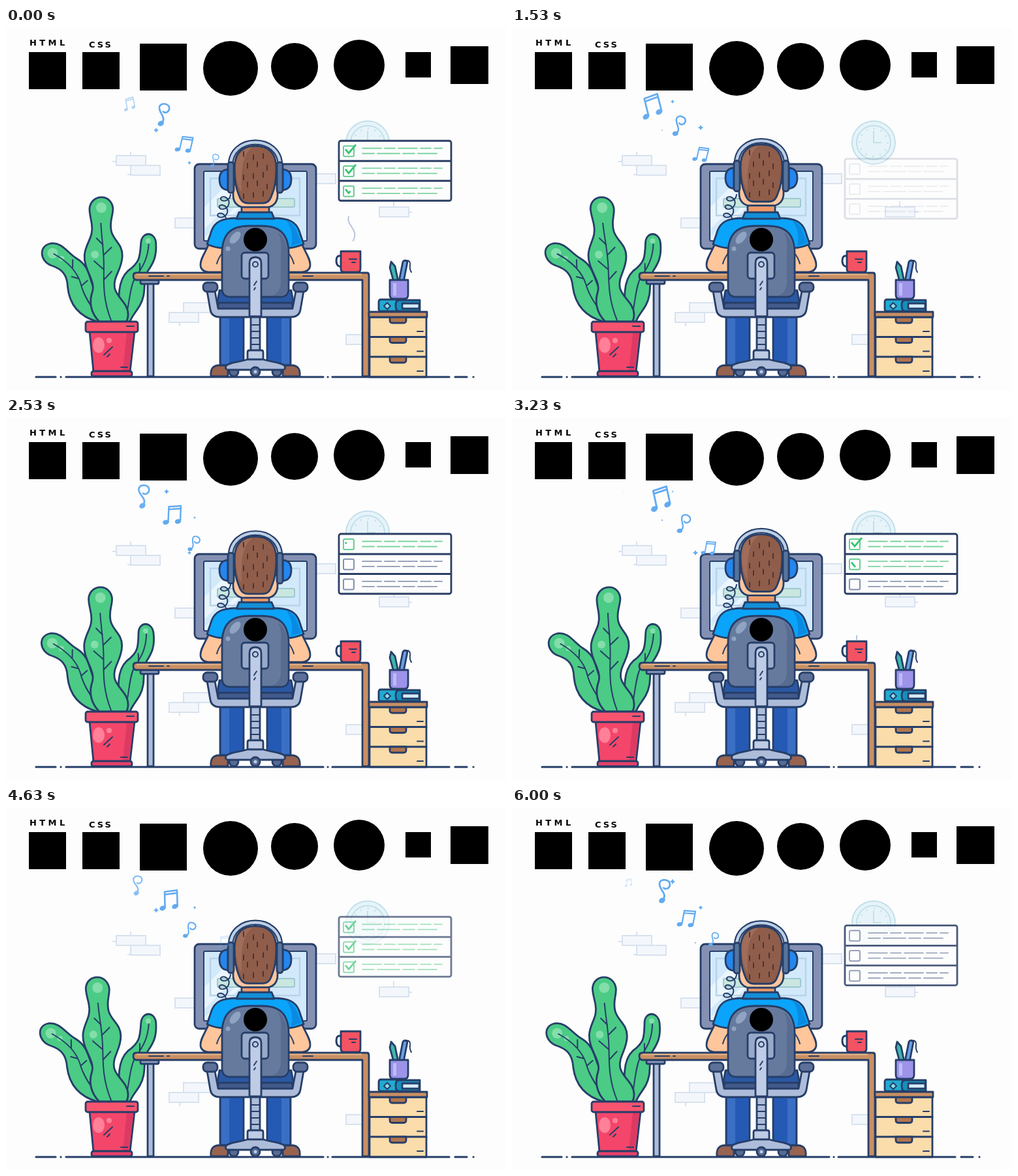
Animation of 766x556 px, one loop 6030 ms. Source, as an HTML page:

```html
<!DOCTYPE html>
<html lang="en">
<head>
<meta charset="utf-8">
<title>Developer at a desk</title>
<style>
html, body { margin: 0; width: 100%; height: 100%; overflow: hidden; background: #fdfdfd; }
svg { display: block; width: 766px; height: 556px; }
.ink { stroke: #263e68; stroke-width: 2.8; stroke-linejoin: round; stroke-linecap: round; }
.thin { stroke: #263e68; stroke-width: 2; fill: none; stroke-linecap: round; stroke-linejoin: round; }
.none { fill: none; }
.label { font: bold 13px "DejaVu Sans", sans-serif; }
.wall { fill: #f3f7fc; stroke: #d8e2ef; stroke-width: 2; }
.clock { fill: #e6f4f9; stroke: #c3dfea; }
.leaf { fill: #4bcb86; }
.note { fill: none; stroke: #62aaf0; stroke-width: 2.4; stroke-linecap: round; stroke-linejoin: round; }
.note ellipse { fill: #62aaf0; stroke: none; }
.row { fill: none; stroke-width: 1.8; stroke-linecap: round; }
.metal { fill: #adbcd9; }
.shine { fill: #bfcce5; }
</style>
</head>
<body>
<svg viewBox="0 0 766 556">
<defs>
  <g id="double" class="note">
    <path d="M-6,11 V-12 L12,-14 V9 M-6,-8 L12,-10"/>
    <ellipse cx="-9.5" cy="11.5" rx="4.5" ry="3.4" transform="rotate(-20 -9.5 11.5)"/>
    <ellipse cx="8.5" cy="9.5" rx="4.5" ry="3.4" transform="rotate(-20 8.5 9.5)"/>
  </g>
  <g id="single" class="note">
    <path d="M-4,12 C5,4 -8,-4 -4,-12 C0,-17 10,-14 9,-7 C8,-2 2,-1 0,-4"/>
    <ellipse cx="-5" cy="12" rx="4.4" ry="3.4" transform="rotate(-20 -5 12)"/>
  </g>
  <path id="spark" d="M0,-4 Q.7,-.7 4,0 Q.7,.7 0,4 Q-.7,.7 -4,0 Q-.7,-.7 0,-4Z" fill="#62aaf0" stroke="#62aaf0"/>
  <rect id="brick" width="45" height="15"/>
  <g id="drawer">
    <rect class="ink" x="557" width="87" height="31" fill="#fbdcab"/>
    <path class="ink" d="M588,0 H613 V5 Q613,9 609,9 H592 Q588,9 588,5Z" fill="#b3754d"/>
    <path class="thin" d="M630,22 H639"/>
  </g>
  <g id="cup">
    <path class="ink" d="M340,217 Q327,218 327,232 Q327,248 340,249Z" fill="#2486ef"/>
    <rect class="ink" x="340" y="206" width="9" height="47" rx="4" fill="#56749c"/>
  </g>
  <g id="arm">
    <path class="ink" d="M311,331 C306,344 297,355 298,365 C299,373 305,375 313,375 H336 V338Z" fill="#ffc69c"/>
    <path class="thin" d="M331,346 Q325,354 323,362"/>
  </g>
  <g id="leg">
    <path class="ink" d="M327,518 H340 V535 H314 Q312,518 327,518Z" fill="#98634f"/>
    <path class="ink" d="M328,436 H364 V518 H328Z" fill="#245ab4"/>
    <path d="M330,446 H342 V516 H330Z" fill="#3a6fc4"/>
  </g>
  <g id="rest">
    <path class="ink metal" d="M308,404 L313,433 Q315,444 328,444 H376 V431 H325 L320,404Z"/>
    <rect class="ink" x="302" y="391" width="22" height="14" rx="6" fill="#5d7099"/>
  </g>
</defs>

<g id="logos">
  <text class="label" x="36" y="27" letter-spacing="4.4">HTML</text>
  <text class="label" x="127" y="30" letter-spacing="3">CSS</text>
  <rect x="35" y="37" width="57" height="57"/>
  <rect x="117" y="37" width="57" height="57"/>
  <rect x="205" y="24" width="72" height="72"/>
  <circle cx="344" cy="62" r="42"/>
  <circle cx="442" cy="59" r="36"/>
  <circle cx="541" cy="57" r="39"/>
  <rect x="612" y="37" width="39" height="39"/>
  <rect x="681" y="28" width="58" height="58"/>
</g>

<g class="wall">
  <use href="#brick" x="169" y="196"/><use href="#brick" x="191" y="211"/>
  <use href="#brick" x="259" y="292"/><use href="#brick" x="460" y="224"/>
  <use href="#brick" x="572" y="275"/><use href="#brick" x="272" y="422"/>
  <use href="#brick" x="250" y="437"/><use href="#brick" x="521" y="471"/>
  <path d="M191,190 V196 M163,205 H169 M186,225 H191 M594,266 V275 M616,283 H622 M266,453 V458"/>
  <g class="clock">
    <circle cx="554" cy="176" r="33"/>
    <circle cx="554" cy="176" r="26"/>
    <circle class="none" cx="554" cy="176" r="21.5" stroke-width="3" pathLength="12" stroke-dasharray=".15 .85"/>
    <path class="none" d="M554,158 V176 H566"/>
  </g>
</g>

<!-- monitor -->
<rect class="ink" x="289" y="209" width="186" height="130" rx="7" fill="#8491b3"/>
<rect class="thin" x="303" y="220" width="158" height="107" rx="2" style="fill:#d2e9fb"/>
<path d="M304,275 L358,221 H392 L304,309Z M304,322 L405,221 H414 L308,326Z" fill="#eaf5fd"/>
<rect class="none" x="313" y="231" width="137" height="57" stroke="#b9d3ea" stroke-width="2.5"/>
<rect x="324" y="262" width="118" height="13" rx="2" fill="#c9e7e0" stroke="#9ec8cf" stroke-width="2"/>

<!-- plant -->
<g id="plant"></g>
<path class="ink" d="M128,466 H197 L190,528 H134Z" fill="#f4466a"/>
<path d="M185,468 H195 L188,526 H179Z" fill="#dc3a63"/>
<rect class="ink" x="122" y="451" width="80" height="16" rx="3" fill="#f8536f"/>
<rect class="ink" x="131" y="527" width="62" height="8" rx="3" fill="#e8416a"/>
<ellipse cx="142" cy="487" rx="9" ry="12" fill="#ff8099"/>
<circle cx="158" cy="480" r="4" fill="#ff8099"/>
<path class="thin" d="M150,502 L163,490 M155,505 L159,501 M185,458 H196 M176,521 H186"/>

<!-- listener -->
<path id="cable" class="thin"/>
<path class="ink" d="M361,262 H403 V295 H361Z" fill="#ffb17c"/>
<path d="M363,275 H401 V281 H363Z" fill="#ee9866"/>
<g id="head">
  <path class="ink" d="M348,240 V258 Q349,272 362,275 H402 Q415,272 416,258 V240Z" fill="#ffc69c"/>
  <path class="ink" d="M350,217 C349,190 364,181 382,181 C400,181 415,190 414,217 C414,236 411,248 407,257 C404,266 400,269 393,269 H371 C364,269 360,266 357,257 C353,248 350,236 350,217Z" fill="#8f5d4a"/>
  <path d="M352,216 C352,192 365,184 378,183 C362,194 360,216 361,252 Q352,240 352,216Z" fill="#9f6d5a"/>
  <g id="strands"></g>
  <path d="M344,213 C342,163 422,163 420,213" fill="none" stroke="#263e68" stroke-width="8.5"/>
  <path d="M344,213 C342,163 422,163 420,213" fill="none" stroke="#bccfe6" stroke-width="4.2"/>
  <use href="#cup"/><use href="#cup" transform="matrix(-1 0 0 1 764 0)"/>
</g>
<use href="#arm"/><use href="#arm" transform="matrix(-1 0 0 1 764 0)"/>
<path class="ink" d="M354,292 H410 C434,292 444,298 449,311 L456,332 Q442,338 431,338 V378 H333 V338 Q321,338 308,332 L315,311 C320,298 330,292 354,292Z" fill="#0aa4fa"/>
<path d="M429,295 Q441,300 445,311 L452,330 L437,335 Q442,312 429,295Z" fill="#0a8ae2"/>
<path class="ink" d="M357,283 H407 L411,293 H353Z" fill="#138fd8"/>

<!-- desk -->
<rect class="ink metal" x="217" y="390" width="9" height="145"/>
<rect class="ink" x="206" y="387" width="28" height="6" rx="2" fill="#8b9bbd"/>
<path class="ink" d="M199,376 H553 Q556,376 556,380 V535 H546 V387 H199 Q195,386 195,381 Q195,376 199,376Z" fill="#c98f63"/>
<path d="M200,378.5 H545" stroke="#e3b48a" stroke-width="2"/>
<path class="thin" d="M219,381 H241 M247,381 H250 M455,381 H470"/>

<!-- mug -->
<path id="steam" class="none" d="M528,341 C526,330 537,325 534,314 C531,304 522,300 525,289" stroke="#b8c6da" stroke-width="2" pathLength="100"/>
<path class="thin" d="M514,350 H510 Q506,351 506,358 Q506,366 514,367" style="stroke-width:3"/>
<path class="ink" d="M513,343 H543 V370 Q543,375 538,375 H518 Q513,375 513,370Z" fill="#f35362"/>
<path class="thin" d="M526,355 H537 M530,360 H535"/>

<!-- cabinet -->
<use href="#drawer" y="444"/><use href="#drawer" y="474.5"/><use href="#drawer" y="505"/>
<rect class="ink" x="556" y="436" width="89" height="8" fill="#c98f63"/>
<rect class="ink" x="571" y="417" width="29" height="18" rx="3" fill="#22aad0"/>
<path class="thin" d="M579,427 L584,422 L589,427 L584,432Z" style="fill:#8fdcee"/>
<path class="ink" d="M634,418 H602 Q597,418 597,426 Q597,435 602,435 H634Z" fill="#168fbd"/>
<path class="ink" d="M633,423 H607 V431 H633Z" fill="#d5ecf8"/>
<path class="ink" d="M594,390 L588,368 L590,359 L596,366 L601,390Z" fill="#3db7ae"/>
<path class="ink" d="M602,389 L608,359 Q611,355 615,359 L609,390Z" fill="#6a9fe4"/>
<path class="thin" d="M614,357 Q620,357 619,365 Q618,370 621,375"/>
<path class="ink" d="M588,387 H616 V410 Q616,416 610,416 H594 Q588,416 588,410Z" fill="#9d93ea"/>
<path d="M593,392 H598 V411 H593Z" fill="#c0baf5"/>

<!-- chair -->
<use href="#leg"/><use href="#leg" transform="matrix(-1 0 0 1 764 0)"/>
<path class="ink" d="M327,403 H437 L442,431 H322Z" fill="#2a58a4"/>
<path class="ink" d="M326,422 H438 L440,432 H324Z" fill="#435a8c"/>
<use href="#rest"/><use href="#rest" transform="matrix(-1 0 0 1 764 0)"/>
<rect class="metal" x="366" y="433" width="32" height="9"/>
<path class="ink" d="M331,400 V346 C331,316 345,304 372,304 H392 C419,304 433,316 433,346 V400 Q433,413 420,413 H344 Q331,413 331,400Z" fill="#667a9e"/>
<path d="M417,314 Q431,324 431,348 V400 Q430,411 420,411 H408 Q421,406 421,390 V346 Q423,326 417,314Z" fill="#586b90"/>
<ellipse cx="351" cy="322" rx="6" ry="11" transform="rotate(40 351 322)" fill="#8fa3c2"/>
<circle cx="340" cy="339" r="3.5" fill="#8fa3c2"/>
<circle cx="382" cy="325" r="18"/>
<rect class="ink" x="361" y="345" width="41" height="40" rx="5" fill="#98a9c9"/>
<path class="ink shine" d="M373,443 V361 Q373,352 382,352 Q391,352 391,361 V443Z"/>
<circle class="thin" cx="382" cy="363" r="4"/>
<path class="thin" d="M380,395 L384,389 M380,402 L382,399"/>
<rect class="ink metal" x="375" y="444" width="14" height="54"/>
<path class="thin" d="M376,456 H388 M376,466 H388 M376,476 H388 M376,486 H388"/>
<path class="ink shine" d="M370,511 V498 Q370,495 373,495 H391 Q394,495 394,498 V511Z"/>
<g fill="#566a92"><circle class="ink" cx="349" cy="528" r="7"/><circle class="ink" cx="415" cy="528" r="7"/></g>
<path class="ink metal" d="M370,509 H394 C410,514 421,513 427,519 Q429,525 423,525 H341 Q335,525 337,519 C343,513 354,514 370,509Z"/>
<circle class="ink" cx="382" cy="528" r="7" fill="#566a92"/>
<circle class="shine" cx="382" cy="528" r="2.5"/>

<path class="ink none" d="M46,536 H76 M84,536 h.1 M92,536 H486 M493,536 h.1 M500,536 H679 M688,536 H706 M716,536 h.1" style="stroke-width:3.2"/>

<g id="list">
  <rect x="510" y="0" width="172" height="92" rx="3" fill="#fdfdfd" stroke="#2a3d63" stroke-width="2.8"/>
  <path d="M510,31 H682 M510,61.5 H682" stroke="#2a3d63" stroke-width="2.8"/>
  <g id="rows"></g>
</g>
<g id="notes"></g>
<g id="sparks"></g>
</svg>

<script>
const LOOP = 6030, CYCLE = 3880, GAP = 970;
const $ = id => document.getElementById(id);
const clamp = v => Math.max(0, Math.min(1, v));
const ramp = (t, from, to) => clamp((t - from) / (to - from));
const smooth = v => v * v * (3 - 2 * v);
const turn = (t, period) => Math.sin(2 * Math.PI * t / period);
const wave = (t, peak, period = CYCLE) => Math.cos(2 * Math.PI * (t - peak) / period);

function set(el, attrs) {
  for (const k in attrs) el.setAttribute(k, attrs[k]);
  return el;
}
function add(parent, tag, attrs = {}) {
  return parent.appendChild(set(document.createElementNS('http://www.w3.org/2000/svg', tag), attrs));
}

// Coiled headphone cable
const coil = Array.from({ length: 61 }, (_, i) => {
  const u = i / 60, a = u * 6 * Math.PI;
  return `${337 - 7 * u + 7 * Math.cos(a)},${256 + 38 * u + 6 * Math.sin(a)}`;
});
set($('cable'), { d: 'M' + coil.join(' L') });

// Short hairs in staggered rows
for (let r = 0; r < 5; r++)
  for (let c = 0; c < 3; c++) {
    const x = 364 + c * 15 + (r % 2) * 6, y = 190 + r * 15 + (c * 5 + r * 3) % 7;
    add($('strands'), 'path', { d: `M${x},${y} v7`, stroke: '#4b3536', 'stroke-width': 2, 'stroke-linecap': 'round' });
  }

// Each leaf bends sideways, more so towards its tip
const leaves = [
  { peak: 400, amp: 2.5, top: 317, spots: [[216, 327, 4]],
    body: 'M176,451 C171,415 170,388 186,373 C204,360 204,352 205,330 C206,312 226,312 228,330 C230,352 224,362 216,374 C208,390 216,406 205,426 C198,438 193,442 190,451Z',
    veins: 'M217,332 C216,358 205,371 197,384 C190,396 189,420 183,448 M204,374 L204,362 M196,386 L207,382' },
  { peak: 3300, amp: 3, top: 335, spots: [[70, 346, 8], [84, 354, 4]],
    body: 'M140,451 C112,443 97,424 94,398 C93,378 84,370 69,365 C50,358 48,335 66,331 C84,328 92,345 107,354 C127,366 126,382 134,399 C139,413 152,429 156,451Z',
    veins: 'M72,347 C97,361 109,376 114,393 C119,413 132,431 147,449 M101,368 L101,356 M111,385 L100,382 M115,396 L124,388' },
  { peak: 3300, amp: 5.7, top: 262, spots: [[143, 276, 8], [135, 348, 6]],
    body: 'M143,451 C129,437 127,420 132,405 C137,388 118,371 119,349 C120,330 133,322 129,301 C127,290 125,285 125,277 C127,254 159,254 161,278 C161,290 156,296 159,311 C162,326 177,331 177,350 C177,371 163,382 166,399 C169,414 187,422 187,440 Q187,447 184,451Z',
    veins: 'M143,300 C145,326 149,344 149,369 C149,396 149,419 161,449 M147,333 L137,323 M148,349 L160,337 M149,371 L134,358 M149,387 L161,374' }
].map(l => {
  const g = add($('plant'), 'g');
  return { ...l, bodyEl: add(g, 'path', { class: 'ink leaf' }),
    dots: l.spots.map(([, cy, r]) => add(g, 'circle', { cy, r, fill: '#83deaa' })),
    veinEl: add(g, 'path', { class: 'thin' }) };
});

const checks = [0, 1, 2].map(i => {
  const g = add($('rows'), 'g', { transform: `translate(0 ${i * 30.7})` });
  return {
    start: 2500 + 620 * i,
    box: add(g, 'rect', { x: 517, y: 8, width: 16, height: 16, rx: 2, fill: 'none', 'stroke-width': 2 }),
    lines: [add(g, 'path', { class: 'row', d: 'M546,11.5 H668', 'stroke-dasharray': '29 5 16 5' }),
      add(g, 'path', { class: 'row', d: 'M546,19.5 H660', 'stroke-dasharray': '18 5 34 5' })],
    tick: add(g, 'path', { d: 'M520,13 L525,19 L536,6', fill: 'none', stroke: '#3cc473', 'stroke-width': 2.8, pathLength: 100 })
  };
});

const notes = [0, 1, 2, 3].map(() => add($('notes'), 'use'));
const sparks = [[246, 113, 2200], [289, 153, 1600], [230, 157, 400], [281, 207, 3200]]
  .map(([x, y, peak]) => ({ x, y, peak, el: add($('sparks'), 'use', { href: '#spark' }) }));

function drawPlant(t) {
  for (const l of leaves) {
    const sway = l.amp * wave(t, l.peak);
    const bend = (x, y) => x + sway * Math.pow(Math.max(0, 451 - y) / (451 - l.top), 1.6);
    const warp = d => d.replace(/([\d.]+),([\d.]+)/g, (_, x, y) => bend(+x, +y).toFixed(2) + ',' + y);
    set(l.bodyEl, { d: warp(l.body) });
    set(l.veinEl, { d: warp(l.veins) });
    l.dots.forEach((el, i) => set(el, { cx: bend(l.spots[i][0], l.spots[i][1]) }));
  }
}

// The list rises in, is ticked row by row, then floats up and fades
function drawList(q) {
  const enter = ramp(q, 1250, 2400), leave = ramp(q, 3300, 5080);
  const y = 178 + 40 * (1 - enter) ** 2 - 14.5 * leave;
  set($('list'), { transform: `translate(0 ${y})`, opacity: smooth(enter) * (1 - leave ** 4) });
  for (const c of checks) {
    const done = ramp(q, c.start, c.start + 300);
    set(c.tick, { 'stroke-dasharray': `${done * 100} 200`, visibility: done ? 'visible' : 'hidden' });
    set(c.box, { stroke: done ? '#68cd92' : '#8392ad' });
    for (const line of c.lines) set(line, { stroke: done ? '#7dd3a0' : '#8b99b2' });
  }
}

function drawSteam(q) {
  const tip = 100 * ramp(q, 3150, 3750), tail = 100 * ramp(q, 3650, 4550);
  set($('steam'), {
    'stroke-dasharray': `0 ${tail} ${Math.max(0, tip - tail)} 200`,
    visibility: tip > tail ? 'visible' : 'hidden'
  });
}

// Notes drift up and left on a gentle wave, growing, then shrinking away
function drawNotes(t) {
  const since = t - 630, latest = Math.floor(since / GAP);
  notes.forEach((el, k) => {
    const n = latest - k, age = since - n * GAP - 200;
    const s = turn(age, 2900), fade = ramp(age, 3500, 2600);
    const x = 328 - .045 * age - 7 * s, y = 205 - .03 * age + 10 * s;
    set(el, {
      href: n % 2 ? '#single' : '#double',
      transform: `translate(${x} ${y}) rotate(${14 * turn(age, 3600)}) scale(${(.65 + age * .00022) * fade})`,
      opacity: ramp(age, -200, 250) * fade
    });
  });
}

function draw(t) {
  const p = t % CYCLE, q = p < 1250 ? p + CYCLE : p;
  set($('head'), { transform: `translate(0 ${2 * wave(t, 400, CYCLE / 2) - .5})` });
  drawPlant(t);
  drawList(q);
  drawSteam(q);
  drawNotes(t);
  for (const s of sparks)
    set(s.el, { transform: `translate(${s.x} ${s.y}) scale(${.85 * clamp(.45 + .6 * wave(t, s.peak))})` });
}

const begin = performance.now();
function tick() {
  draw((performance.now() - begin) % LOOP);
  requestAnimationFrame(tick);
}
tick();
</script>
</body>
</html>
```
